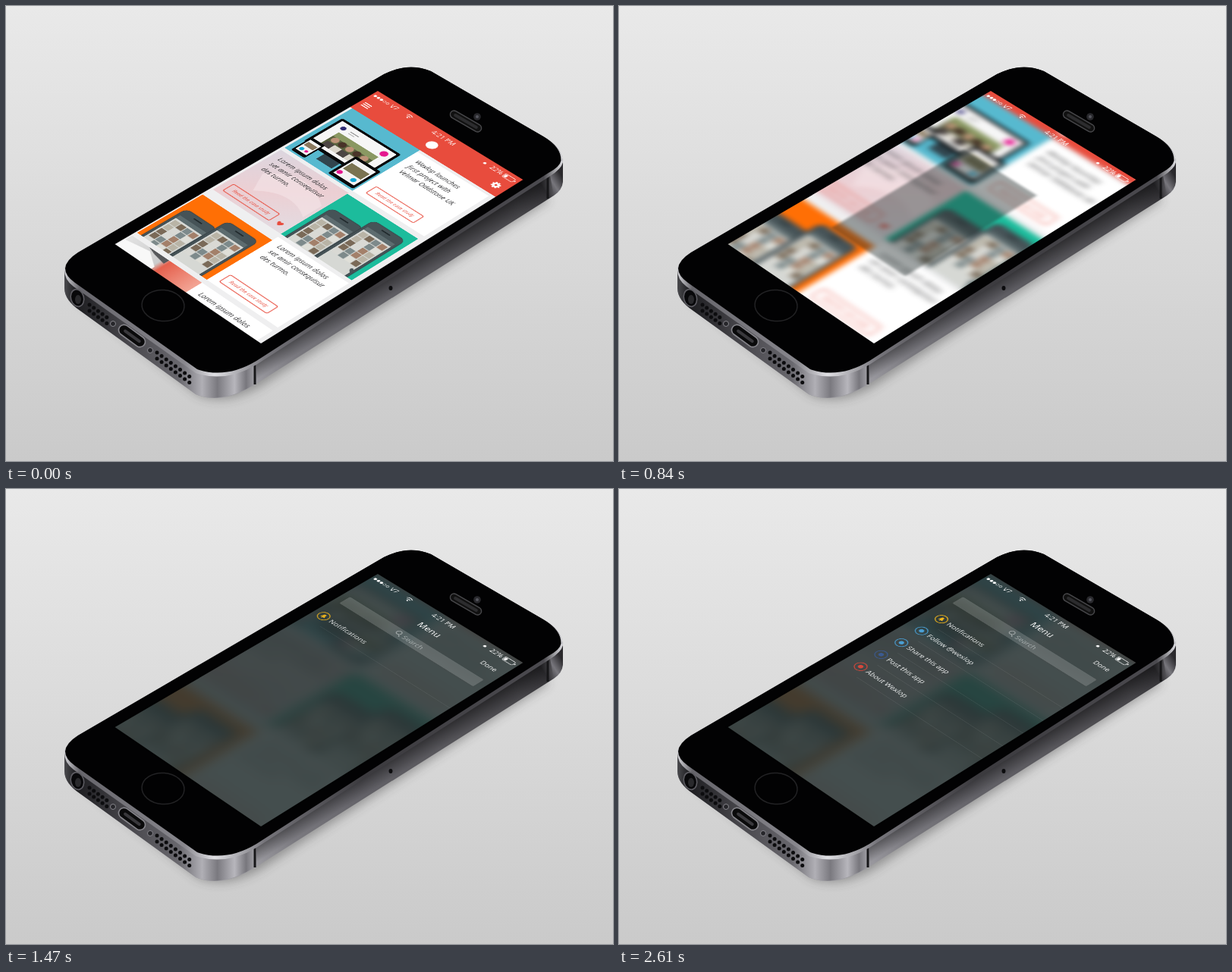
Write an HTML page that moves like this. It is 800x600 px and loops after 3.51 s.

```html
<!DOCTYPE html>
<html lang="en">
<head>
<meta charset="utf-8">
<title>Phone menu</title>
<style>
html, body { margin: 0; width: 100%; height: 100%; overflow: hidden; }
body { position: relative; background: linear-gradient(#e9e9e9, #dadada 50%, #cacaca); }
svg { position: absolute; left: 0; top: 0; display: block; }
#screen { position: absolute; left: 0; top: 0; width: 320px; height: 568px; overflow: hidden;
  background: #efeff0; transform-origin: 0 0; }
#screen svg text { font-family: "Open Sans", "Noto Sans", sans-serif; }
#screen svg .status text { font-family: "Liberation Sans", Arial, sans-serif; }
#feed { transform-origin: 160px 284px; }
#shade { position: absolute; inset: 0; background: rgb(41, 52, 52); filter: blur(5px); }
</style>
</head>
<body>
<svg id="phone" width="800" height="600" viewBox="0 0 800 600">
  <defs>
    <filter id="soft" x="-10%" y="-10%" width="120%" height="125%"><feGaussianBlur stdDeviation="7"/></filter>
    <linearGradient id="side" gradientUnits="userSpaceOnUse" x1="328" y1="490" x2="733" y2="225">
      <stop offset="0" stop-color="#9a999f"/><stop offset=".12" stop-color="#7b7a80"/>
      <stop offset=".35" stop-color="#626167"/><stop offset=".6" stop-color="#57565b"/>
      <stop offset=".85" stop-color="#454448"/><stop offset=".94" stop-color="#333236"/>
      <stop offset=".97" stop-color="#77767c"/><stop offset="1" stop-color="#2a292c"/>
    </linearGradient>
    <linearGradient id="dim" gradientUnits="userSpaceOnUse" x1="516" y1="343" x2="531" y2="367">
      <stop offset="0" stop-opacity=".6"/><stop offset="1" stop-opacity="0"/>
    </linearGradient>
    <linearGradient id="base" gradientUnits="userSpaceOnUse" x1="77" y1="0" x2="329" y2="0">
      <stop offset="0" stop-color="#4a4a4e"/><stop offset=".06" stop-color="#1d1d20"/>
      <stop offset=".3" stop-color="#434247"/><stop offset=".6" stop-color="#69686e"/>
      <stop offset=".72" stop-color="#b0afb5"/><stop offset=".8" stop-color="#7a797f"/>
      <stop offset=".89" stop-color="#b7b6bc"/><stop offset=".95" stop-color="#78777d"/>
      <stop offset="1" stop-color="#a5a4aa"/>
    </linearGradient>
    <linearGradient id="rim" gradientUnits="userSpaceOnUse" x1="77" y1="0" x2="735" y2="0">
      <stop offset="0" stop-color="#d4d4d8"/><stop offset=".03" stop-color="#66656b"/>
      <stop offset=".24" stop-color="#88878d"/><stop offset=".3" stop-color="#e0e0e4"/>
      <stop offset=".4" stop-color="#77767c"/><stop offset=".6" stop-color="#3b3a3e"/>
      <stop offset=".96" stop-color="#4b4a4f"/><stop offset="1" stop-color="#e4e4e8"/>
    </linearGradient>
  </defs>
  <path d="M92 385L252 512Q285 528 333 503L716 256L650 190L120 340Z" fill="#333" opacity=".4" filter="url(#soft)"/>
  <path d="M77 348Q78 336 95 325L498 90Q530 74 560 86L708 172Q734 187 734 208V232Q733 243 722 250L330 498Q285 527 250 512L98 402Q77 388 77 372Z" fill="url(#side)"/>
  <path d="M330 465L716 218L722 250L330 498Z" fill="url(#dim)"/>
  <path d="M77 348V372Q77 388 98 402L250 512Q285 526 329 498V468L240 460Z" fill="url(#base)"/>
  <path d="M328 470V499M714 222V254" stroke="#161618" stroke-width="3"/>
  <path d="M77 348Q78 336 95 325L498 90Q530 74 560 86L708 172Q734 187 734 206Q732 215 716 225L330 473Q290 497 250 484L89 370Q77 361 77 348Z" fill="url(#rim)"/>
  <path d="M78 346Q79 335 95 325L498 90Q530 74 560 86L708 172Q732 186 731.500 204Q730 212 715 220L330 468Q290 492 252 479L91 365Q78 356 78 346Z" fill="#020203"/>
  <ellipse cx="207" cy="395" rx="28" ry="20.5" fill="none" stroke="#222224" stroke-width="1.5" transform="rotate(4 207 395)"/>
  <g transform="rotate(30 606 152)">
    <rect x="583" y="147" width="46" height="10" rx="5" fill="#111" stroke="#48484b" stroke-width="1.4"/>
    <rect x="588" y="150" width="36" height="4" rx="2" fill="#2c2c2e"/>
  </g>
  <circle cx="621" cy="146" r="4.8" fill="#29292d"/><circle cx="621" cy="146" r="2" fill="#55565e"/>
  <ellipse cx="94" cy="385" rx="8.5" ry="11.5" fill="#08080a" stroke="#5c5b61" stroke-width="1.6" transform="rotate(-15 94 385)"/>
  <ellipse cx="95" cy="387" rx="4" ry="6" fill="#29292c"/>
  <g transform="rotate(36 166 435)">
    <rect x="146" y="428" width="40" height="14" rx="7" fill="#0a0a0b" stroke="#85848a" stroke-width="1.6"/>
    <rect x="153" y="433" width="27" height="4" rx="2" fill="#39383c"/>
  </g>
  <g id="holes"></g>
  <ellipse cx="507" cy="372" rx="2.5" ry="3" fill="#0c0c0e"/>
</svg>
<div id="screen">
  <svg id="feed" width="320" height="568"></svg>
  <div id="shade"></div>
  <svg id="menu" width="320" height="568"></svg>
  <svg class="status" id="status" width="320" height="568"></svg>
</div>
<svg width="800" height="600"><polygon id="bezel" fill="none" stroke="#020203" stroke-width="1.6"/></svg>
<script>
const $ = id => document.getElementById(id);
const clamp = v => Math.max(0, Math.min(1, v));
const range = n => [...Array(n).keys()];
const rect = (x, y, w, h, fill, more = '') =>
  `<rect x="${x}" y="${y}" width="${w}" height="${h}" fill="${fill}" ${more}/>`;
const dot = (x, y, r, fill, more = '') =>
  `<circle cx="${x}" cy="${y}" r="${r}" fill="${fill}" ${more}/>`;
const text = (x, y, size, fill, str, more = '') =>
  `<text x="${x}" y="${y}" dy=".35em" font-size="${size}" fill="${fill}" ${more}>${str}</text>`;
const middle = 'text-anchor="middle"';
const ring = color => `stroke="${color}" stroke-width="1.4"`;

// Maps a w by h box onto four corners: top left, top right, bottom right, bottom left
function project(w, h, [x0, y0], [x1, y1], [x2, y2], [x3, y3]) {
  const sx = x0 - x1 + x2 - x3, sy = y0 - y1 + y2 - y3;
  const ax = x1 - x2, ay = y1 - y2, bx = x3 - x2, by = y3 - y2;
  const det = ax * by - bx * ay;
  const g = (sx * by - bx * sy) / det, k = (ax * sy - sx * ay) / det;
  return `matrix3d(${[
    (x1 - x0 + g * x1) / w, (y1 - y0 + g * y1) / w, 0, g / w,
    (x3 - x0 + k * x3) / h, (y3 - y0 + k * y3) / h, 0, k / h,
    0, 0, 1, 0, x0, y0, 0, 1]})`;
}
const corners = [[490, 111], [683, 229], [336, 446], [142, 314]];
$('screen').style.transform = project(320, 568, ...corners);
$('bezel').setAttribute('points', corners.join(' '));

function holes(x, y, n, dx, dy) {
  return range(n * 2).map(i =>
    dot(x + (i >> 1) * dx, y + (i >> 1) * dy + (i % 2) * 8, 2.5, '#0c0c0e')).join('');
}
$('holes').innerHTML = holes(110, 394, 5, 5.7, 4.1) + holes(199, 457, 8, 6.1, 4.5) +
  [[141, 419], [190, 454]].map(([x, y]) => dot(x, y, 3.5, '#26262a', 'stroke="#88878d"')).join('');

const red = '#e84c3d', ink = '#2c2c2e', lorem = ['Lorem ipsum dolos', 'set amir consequisur', 'des turmo.'];
const italic = 'font-style="italic"';
const heart = (x, y, fill) =>
  `<path transform="translate(${x} ${y})" d="M0 5C-10-2-4-8 0-3C4-8 10-2 0 5Z" fill="${fill}"/>`;
const lines = (x, y, rows) =>
  rows.map((s, i) => text(x, y + i * 18, 12.6, ink, s, italic + ' font-weight="500"')).join('');
const button = (x, y) => rect(x, y - 11.5, 102, 23, 'none', `rx="3" ${ring(red)}`) +
  text(x + 51, y, 9.2, red, 'Read the case study', `${middle} ${italic} font-weight="500"`);

// One handset showing a small grid of room pictures
function handset(x, y, h) {
  const tones = ['#b9b4a6', '#7a6a58', '#d9d9d4', '#7d8a8b', '#a3806a', '#dfdfd8'];
  return rect(x, y, 68, h + 20, '#465357', 'rx="10" stroke="#333e42"') +
    rect(x + 25, y + 7, 18, 2.5, '#1f282b', 'rx="1"') +
    rect(x + 5, y + 18, 58, h, '#d6d8d4') + rect(x + 5, y + 18, 58, 9, '#5d6c6f') +
    range(20).map(i => rect(x + 8 + i % 4 * 13.5, y + 31 + (i >> 2) * 14, 12, 12.5, tones[i * 7 % 11 % 6])).join('');
}
function pair(id, x, y, w, h, fill) {
  return `<clipPath id="${id}">${rect(x, y, w, h, fill)}</clipPath><g clip-path="url(#${id})">` +
    rect(x, y, w, h, fill) + handset(x + 9, y + 42, h) + handset(x + 74, y + 17, h) + '</g>';
}
function devices() {
  return rect(14, 94, 130, 86, '#08090b', 'rx="4"') + rect(19, 99, 120, 74, '#f6f6f6') +
    dot(34, 112, 5, '#2e2a72') + rect(48, 109, 18, 2, '#999') + rect(48, 114, 13, 2, '#bbb') +
    rect(36, 124, 88, 42, '#58613d') + rect(36, 124, 88, 13, '#8a9862') +
    range(5).map(i => dot(47 + i * 16, 143, 7, i % 2 ? '#493328' : '#bc9277') +
      rect(39 + i * 16, 152, 16, 14, i % 2 ? '#dad5cb' : '#4c4543')).join('') +
    dot(124, 112, 7, '#e5178f') + rect(60, 180, 34, 18, '#31454e') +
    rect(98, 148, 55, 62, '#08090b', 'rx="4"') + rect(103, 154, 45, 49, '#f3f3f3') +
    rect(106, 165, 39, 20, '#7a7352') + dot(109, 195, 5, '#e5178f') + dot(138, 194, 5, '#12a7d5') +
    rect(16, 164, 30, 46, '#08090b', 'rx="4"') + rect(19, 170, 24, 33, '#f3f3f3') +
    rect(21, 176, 20, 11, '#8a785e') + dot(26, 196, 4, '#12a7d5') + dot(36, 196, 3, '#e5178f');
}

$('feed').innerHTML = `<defs>
  <linearGradient id="haze" x2="1" y2="1"><stop stop-color="#dcd6df"/><stop offset=".5" stop-color="#eccfd3"/><stop offset="1" stop-color="#e2dce2"/></linearGradient>
  <linearGradient id="photo"><stop stop-color="#e2e2e2"/><stop offset=".48" stop-color="#cbcbcc"/><stop offset=".56" stop-color="#e5604d"/><stop offset="1" stop-color="#f3a595"/></linearGradient></defs>` +
  rect(-40, -60, 400, 700, '#efeff0') +
  rect(6, 64, 150, 150, '#57b9cf') + rect(156, 70, 154, 144, '#fff') + devices() +
  lines(172, 89, ['Wexlop launches', 'first project with', 'Velmar Oddstone UK']) + button(174, 191) +
  rect(6, 222, 150, 146, 'url(#haze)') +
  '<path d="M30 285Q75 225 150 275V315Q95 280 50 325Z" fill="#f4e3e6" opacity=".65"/>' +
  lines(20, 240, lorem) + button(18, 347) + heart(137, 352, red) +
  pair('jade', 156, 225, 152, 143, '#1cbc9c') + heart(293, 352, '#465357') +
  pair('amber', 4, 388, 154, 136, '#ff6f05') + rect(158, 376, 152, 148, '#fff') +
  lines(174, 391, lorem) + button(174, 502) +
  rect(4, 534, 154, 100, 'url(#photo)') +
  '<path d="M4 548L50 540L82 560V568H4Z" fill="#f8f8f8"/><path d="M42 534H86V545L60 540Z" fill="#57585b"/>' +
  rect(158, 534, 152, 100, '#fff') + lines(174, 554, lorem) +
  rect(-40, -60, 400, 124, red) +
  range(3).map(i => rect(9, 37 + i * 4.5, 15, 2, '#fff')).join('') +
  dot(160, 41, 10, '#fff') +
  dot(299, 42, 4.3, 'none', 'stroke="#fff" stroke-width="4"') +
  dot(299, 42, 6.8, 'none', 'stroke="#fff" stroke-width="2.6" stroke-dasharray="2.67 2.67"');

$('status').innerHTML =
  range(5).map(i => dot(8.5 + i * 6.8, 14, 2.4, i < 3 ? '#fff' : 'none', 'stroke="#fff" stroke-width=".8"')).join('') +
  text(43, 14, 12.5, '#fff', 'V7') +
  '<g fill="none" stroke="#fff" stroke-width="1.6"><path d="M77 12Q83 7 89 12M79.5 15Q83 12 86.5 15"/></g>' +
  dot(83, 17.5, 1.5, '#fff') +
  text(160, 14, 13, '#fff', '4:21 PM', middle) + dot(249, 14, 2.6, '#fff') +
  text(274, 14, 12.5, '#fff', '22%', middle) +
  rect(290, 9.5, 21, 9.5, 'none', 'rx="2" stroke="#fff"') + rect(291.5, 11, 5, 6.5, '#fff') +
  rect(312.5, 12.5, 1.5, 3.5, '#fff');

const items = [
  ['Notifications', '#f4b81c'],
  ['Follow @wexlop', '#4a9fd4'],
  ['Share this app', '#4a9fd4'],
  ['Post this app', '#3b5a92'],
  ['About Wexlop', '#d8473a']
];
const bell = '<path d="M27 146Q29.500 144 29.500 141Q29.500 138 32 138T34.500 141Q34.500 144 37 146ZM30.500 147H33.500L32 148.500Z" fill="#f4b81c"/>';
$('menu').innerHTML = '<g id="head">' +
  text(160, 47, 17, '#fff', 'Menu', middle) + text(288, 47, 12.5, '#fff', 'Done', middle) +
  rect(14, 77, 292, 24, '#fff', 'opacity=".17" rx="2"') +
  dot(133, 87, 4.5, 'none', ring('#aab1b1')) + '<path d="M136 91L140 95" stroke="#aab1b1" stroke-width="1.5"/>' +
  text(144, 89, 13.5, '#a8afaf', 'Search') + '</g>' +
  items.map(([label, color], i) => `<g class="item"><g transform="translate(0 ${i * 44})">` +
    dot(32, 143, 10, 'none', ring(color)) + (i ? dot(32, 143, 4.3, color) : bell) +
    text(47, 143, 13.4, '#f2f4f4', label) + rect(47, 165, 300, 1, '#fff', 'opacity=".08"') + '</g></g>').join('');

const rows = [...document.querySelectorAll('.item')];
const ease = p => p * p * (3 - 2 * p);
const LOOP = 3510, STEP = 30;

function draw(t) {
  const zoom = clamp((t - 540) / 360) ** 2;
  $('feed').style.transform = `scale(${1 + .3 * zoom})`;
  $('feed').style.filter = zoom ? `blur(${9 * zoom * zoom}px)` : 'none';
  // The shade grows from the centre, then past the edges
  const grow = clamp((t - 780) / 120);
  $('shade').style.transform = `scale(${grow + .1 * clamp((t - 900) / 180)})`;
  $('shade').style.opacity = .87 * grow;
  $('head').style.opacity = clamp((t - 1110) / 240);
  rows.forEach((row, i) => {
    const slide = ease(clamp((t - 1350 - i * 252) / 252));
    row.setAttribute('transform', `translate(${20 * (slide - 1)} 0)`);
    row.style.opacity = clamp(slide * 2);
  });
}

const start = performance.now();
function tick() {
  const t = (performance.now() - start) % LOOP;
  draw(Math.floor(t / STEP) * STEP);
  requestAnimationFrame(tick);
}
tick();
</script>
</body>
</html>
```
